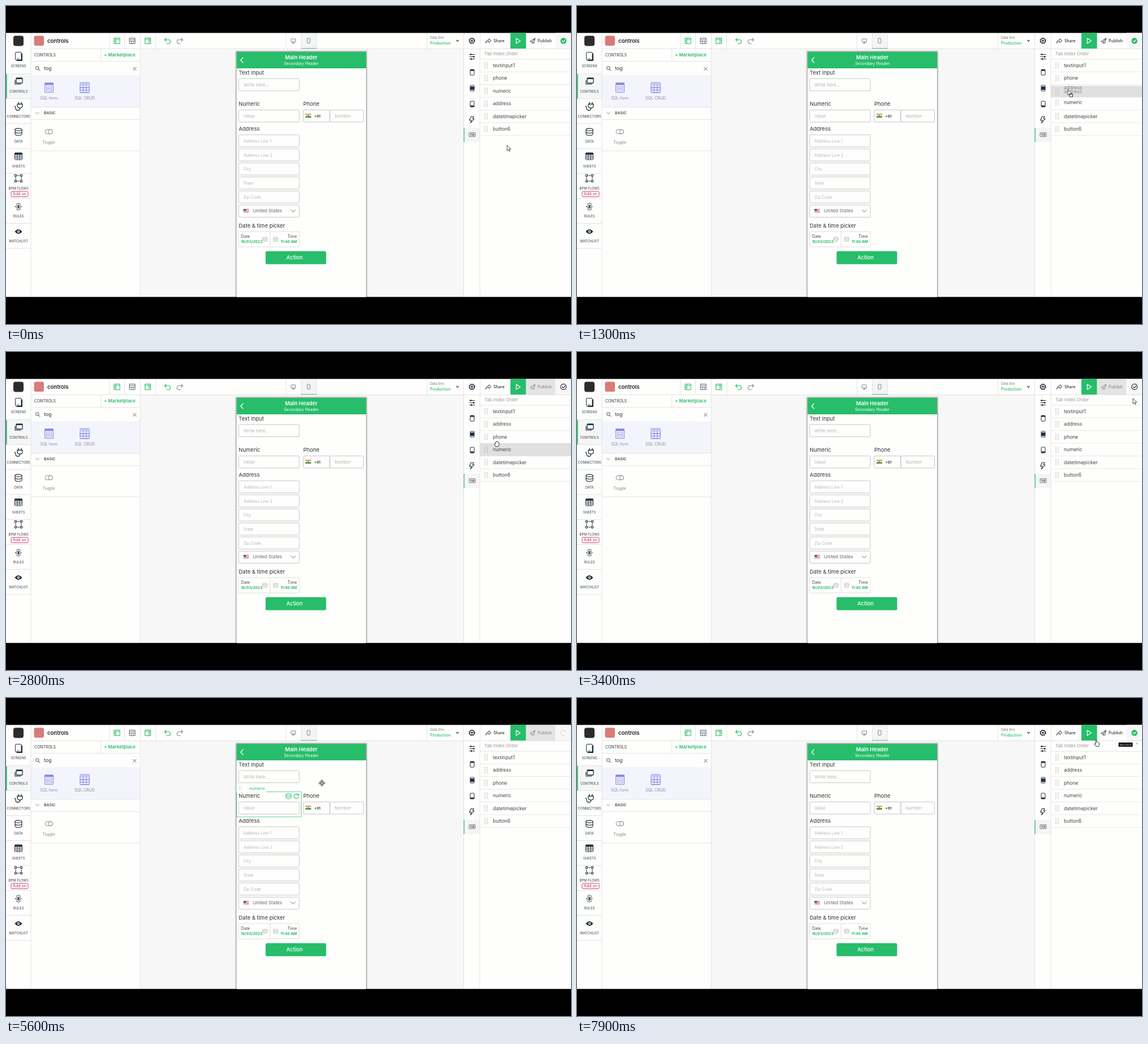
These frames come from a looping animation (998x561 px, 8 s). An HTML page:

```html
<!DOCTYPE html>
<html lang="en">
<head>
<meta charset="utf-8">
<title>Tab index order</title>
<style>
html, body { margin: 0; width: 100%; height: 100%; overflow: hidden; background: #000; }
svg { display: block; width: 100vw; height: 100vh; }
text { font-family: Inter, "Open Sans", sans-serif; white-space: pre; }
</style>
</head>
<body>
<svg id="stage" viewBox="0 0 998 561"></svg>
<script>
const GREEN = '#27bd6a', INK = '#22313f', LINE = '#e3e3e3', BODY = '#444', HINT = '#b5b5b5', PAPER = '#fefffd';
const LOOP = 8000, STEP = 100;

// Drawing helpers, each returns markup
const rect = (x, y, w, h, fill, more = '') =>
  `<rect x="${x}" y="${y}" width="${w}" height="${h}" fill="${fill}" ${more}/>`;
const box = (x, y, w, h, stroke = '#c6c6c6', r = 1.5, sw = 1, fill = 'none') =>
  rect(x, y, w, h, fill, `stroke="${stroke}" stroke-width="${sw}" rx="${r}"`);
const text = (x, y, size, str, fill = BODY, weight = 400, anchor = 'start') =>
  `<text x="${x}" y="${y}" font-size="${size}" fill="${fill}" font-weight="${weight}" text-anchor="${anchor}">${str}</text>`;
const path = (d, stroke = INK, sw = 1, fill = 'none') =>
  `<path d="${d}" stroke="${stroke}" stroke-width="${sw}" fill="${fill}" stroke-linecap="round" stroke-linejoin="round"/>`;
const circle = (x, y, r, fill = 'none', stroke = 'none', sw = 1, more = '') =>
  `<circle cx="${x}" cy="${y}" r="${r}" fill="${fill}" stroke="${stroke}" stroke-width="${sw}" ${more}/>`;
const hline = (x, y, w, c = LINE) => rect(x, y, w, 1, c);
const vline = (x, y, h, c = LINE) => rect(x, y, 1, h, c);
const at = (x, y, body, more = '') => `<g transform="translate(${x} ${y}) ${more}">${body}</g>`;

const database = (c, s = 1) => at(0, 0,
  `<ellipse cy="-4" rx="6" ry="2.2" fill="none" stroke="${c}" stroke-width="1.2"/>` +
  path('M-6-4V4C-6 7 6 7 6 4V-4M-6 0C-6 3 6 3 6 0', c, 1.2), `scale(${s})`);

const table = (c, head) => box(-6.5, -6, 13, 12, c, 1, 1) + rect(-6.5, -6, 13, 3.5, head) +
  path('M-2.2-3V6M2.2-3V6M-6 0H6M-6 3H6', c, .9);

const eye = pupil => path('M-6 0Q0-7 6 0Q0 7-6 0Z', INK, 1.1, pupil ? INK : 'none') +
  circle(0, 0, 2.2, pupil ? '#fff' : INK) + (pupil ? circle(0, 0, 1.1, INK) : '');

function sideNav() {
  const nodes = [[-5, -5], [5, -5], [-5, 5], [5, 5]].map(([x, y]) => box(x - 1.6, y - 1.6, 3.2, 3.2, INK, 1, 1.2)).join('');
  const items = [
    ['SCREENS', 89, 108, rect(-3.5, -5.5, 10.5, 13.5, INK, 'rx="1"') + box(-5.5, -7.5, 10.5, 13.5, INK, 1, 1, '#fff') + path('M-2 4H1.5', INK, .8)],
    ['CONTROLS', 133, 152.5, path('M-6-2V5H4', INK, 1.2) + box(-4, -6, 11, 9, INK, 1, 1.3) + rect(-4, -6, 11, 2, INK)],
    ['CONNECTORS', 177, 196.5, path('M0-7V-4M5-7V-4M2.5 3V4Q2.5 7-1 7Q-5 7-5 3Q-5 0-7 0', INK, 1.3) + path('M-2-4H7V-1Q7 3 2.5 3Q-2 3-2-1Z', INK, 1.3)],
    ['DATA', 222, 240.5, database(INK)],
    ['SHEETS', 265, 284.5, table(INK, INK)],
    ['BPM FLOWS', 304, 324, nodes + path('M-2-5H2M-5-2V2M5-2V2M-2 5H2', INK, .9)],
    ['RULES', 354, 373, path('M-4-4L0-6.3L4-4M-4 4L0 6.3L4 4', INK, .9) + at(0, 0, eye(false), 'scale(.85)')],
    ['WATCHLIST', 398, 416.5, eye(true)]
  ];
  let out = rect(0, 75, 44, 438.5, PAPER) + rect(0, 119, 44, 44, '#f5f6f6') + rect(0, 119, 1.6, 44, GREEN);
  items.forEach(([name, iconY, base, icon], i) => {
    out += at(22, iconY, icon) + text(22.2, base, 5.9, name, '#333f4a', 400, 'middle') + hline(0, 119 + 44 * i, 44);
  });
  return out + box(9, 327, 30, 9.5, '#cf3f78', 2, 1, '#fff') + text(24, 334.4, 7.1, 'Add on', '#b92d66', 400, 'middle') + vline(43.5, 48, 465);
}

function controlsPanel() {
  const violet = '#8a8de6';
  const form = box(-7.5, -8.5, 15, 17, violet, 1, 1.1) + rect(-7.5, -8.5, 15, 4, violet) +
    box(-5, -2, 10, 3, violet, 0, .8) + box(-5, 3, 10, 3, violet, 0, .8);
  return rect(44, 75, 193, 438.5, PAPER) +
    text(50, 88.6, 6.9, 'CONTROLS', '#333') + vline(167, 75, 22) + hline(44, 97, 193) +
    text(173, 89, 8, '+ Marketplace', GREEN, 600) +
    circle(55.3, 109.5, 2.8, 'none', '#444') + path('M57.5 111.7L60 114', '#444') +
    text(67, 113.2, 8.8, 'tog', '#333') + path('M224.5 108L230 113.5M230 108L224.5 113.5', '#555', .9) +
    rect(44, 122, 193, 56, '#f4f5fc') +
    at(76, 144, form) + at(139, 144, table(violet, '#c9caf4'), 'scale(1.25 1.45)') +
    text(75.7, 165, 6.9, 'SQL form', '#8b8b95', 400, 'middle') + text(139, 165, 7.1, 'SQL CRUD', '#8b8b95', 400, 'middle') +
    hline(44, 178, 193) + path('M52.5 187.7L55.2 190.4L58 187.7', '#777', .9) + text(67, 191.3, 6.8, 'BASIC', '#333', 500) +
    hline(44, 200, 193) + box(69, 218, 13.5, 7.5, '#8b8b8b', 3.7, 1) + circle(78.7, 221.7, 3.7, '#fff', '#8b8b8b') +
    text(75.7, 243, 6.9, 'Toggle', '#888', 400, 'middle') + hline(44, 255, 193) + vline(236.5, 75, 438);
}

function topBar() {
  const pane = (x, c, inner) => box(x - 5, 56.5, 10, 10, c, .5, 1.1) + path(inner, c, 1);
  let out = rect(0, 47, 998, 28, PAPER) + rect(521, 48, 28, 27, '#f4f5f5') + hline(0, 75, 998);
  for (const x of [182, 209, 237, 264, 494, 521, 548, 743, 808, 837]) out += vline(x, 48, 27);
  return out + rect(13, 52.5, 18, 18, '#2c2c2c', 'rx="4"') + rect(49.5, 52.5, 17.5, 17.5, '#d97b78', 'rx="3"') +
    text(73, 64.6, 9.5, 'controls', '#222', 600) +
    pane(196, GREEN, 'M194 57V66M191 60H194M191 63H194M194 59H201') +
    pane(223, '#6d7780', 'M218 59H228M218 62H228M221.5 62V66M225 62V66') +
    pane(250.5, GREEN, 'M252.5 57V66M246 59H255M252.5 62H255') +
    path('M283 56.8L280.3 59.5L283 62.3M280.5 59.5H287C291.5 59.5 291.5 66.5 287 66.5H284', GREEN, 1.2) +
    path('M309.5 56.8L312.2 59.5L309.5 62.3M312 59.5H305.5C301 59.5 301 66.5 305.5 66.5H308', '#848b91', 1.1) +
    box(503.5, 58, 8, 5.5, '#7b858d', .5) + path('M505.5 65.5H509.5M507.5 63.5V65.5', '#7b858d') +
    box(532, 57, 5, 8.5, '#7b858d', 1) + rect(521, 74.3, 28, 1, '#5fb58a') +
    text(749, 58.3, 5.9, 'Data Env', '#777') + text(749, 68.1, 7, 'Production', GREEN, 500) +
    path('M795.5 60.3L797.5 62.3L799.5 60.3', '#333', 1.2) +
    circle(823, 61.3, 4.8, 'none', INK, 1.6, 'stroke-dasharray="2.6 1.17"') + circle(823, 61.3, 3.8, 'none', INK, 1) + circle(823, 61.3, 1.7, INK) +
    path('M847.5 65C848 61 850 60 853 60V57.7L857 61.2L853 64.5V62.4C850 62.4 849 63 847.5 65Z', INK, .9) +
    text(861, 64, 7.1, 'Share', '#333', 500) +
    rect(891, 47, 27.6, 28, GREEN) + path('M901.3 57L908.5 61.5L901.3 66Z', '#fff', 1.2);
}

function phone() {
  const field = (y, hint, size = 7.2, x = 411, w = 107, h = 21.5) => box(x, y, w, h) + text(x + 8.5, y + 13.6, size, hint, HINT);
  const label = (x, y, str) => text(x, y, 9.5, str, '#333');
  const calendar = x => box(x, 408, 7.5, 7, '#aaa', 1, .8) + path(`M${x} 410.3h7.5M${x + 1.5} 412.6h4.5`, '#aaa', .7);
  let out = rect(237, 75.5, 571, 438, '#f7f7f7');
  for (let i = 3; i > 0; i--) out += rect(407.3 - i, 81 - i, 228.7 + 2 * i, 440, '#000', `opacity="${.2 / i}" rx="2"`);
  out += rect(407.3, 81, 228.7, 433, PAPER) + rect(407.3, 81, 228.7, 29, GREEN) +
    path('M418.7 91L414.5 95.5L418.7 100', '#fff', 1.2) +
    text(521.5, 93.8, 9.3, 'Main Header', '#fff', 600, 'middle') + text(521.5, 103.5, 6.9, 'Secondary Header', '#fff', 400, 'middle') +
    label(411, 121.3, 'Text Input') + field(128, 'Write here...', 7.9) +
    label(411, 176.3, 'Numeric') + field(183.3, 'Value', 7.5) +
    label(525, 176.3, 'Phone') + field(183.3, 'Number', 7.6, 572, 59.5) + box(525, 183.3, 47, 21.5) +
    rect(529, 190, 10, 2.4, '#f29a3e') + rect(529, 192.4, 10, 2, '#eee') + rect(529, 194.4, 10, 2.4, '#2d8a3e') + circle(534, 193.4, .8, '#335') +
    text(544.3, 196.5, 6.5, '+91', '#333', 600) + label(411, 220.3, 'Address');
  ['Address Line 1', 'Address Line 2', 'City', 'State', 'Zip Code'].forEach((s, i) => out += field(227.2 + 24.75 * i, s));
  out += box(411, 351.2, 107, 21.5);
  for (let i = 0; i < 5; i++) out += rect(419.5, 358 + i * 1.2, 9.5, 1.2, i % 2 ? '#f3e6e6' : '#d65a63');
  return out + rect(419.5, 358, 4.5, 3.4, '#46569b') + text(436, 364, 8.2, 'United States', '#666') +
    path('M503.5 359.7L507.3 363.4L511 359.7', '#555', .9) +
    label(411, 390.7, 'Date &amp; time picker') + box(411, 398, 107, 27, '#ddd', 1) + vline(466, 398, 27, '#ddd') +
    text(415, 409, 7.2, 'Date', '#444') + text(415, 418, 6.6, '16/03/2023', GREEN, 700) + calendar(453.5) +
    text(514, 409, 7.2, 'Time', '#444', 400, 'end') + text(514, 418, 6.6, '11:46 AM', GREEN, 700, 'end') + calendar(472.5) +
    rect(458.5, 432.5, 107, 23, GREEN, 'rx="2.5"') + text(509.7, 447, 9.4, 'Action', '#fff', 500, 'middle');
}

function toolStrip() {
  return rect(808, 75.5, 29, 438, PAPER) + vline(808, 75, 438) + rect(809, 215, 28, 25, '#f5f5f5') + rect(808.5, 215, 1.2, 25, GREEN) +
    path('M819 85.5H828M819 89.5H828M819 93.5H828', INK, 1) +
    [[821, 85.5], [826, 89.5], [822, 93.5]].map(([x, y]) => rect(x - .9, y - 1.5, 1.8, 3, INK)).join('') +
    box(820, 112, 7, 10, INK, 1) + rect(820, 112, 7, 2.5, INK) +
    box(820, 140, 7, 10, INK, 1) + rect(820, 142, 7, 6, INK) +
    box(820, 168, 7, 10, INK, 1) + rect(820, 175.5, 7, 2.5, INK) +
    path('M821.5 195H826L824.2 199H827L820.5 206.5L822 201.5H818.5Z', INK, 1.1) +
    box(818, 223.5, 11, 7, '#555', 1, .8) + text(823.5, 228.9, 4.3, 'TAB', '#333', 600, 'middle') +
    rect(837, 75.5, 161, 438, PAPER) + vline(836.5, 75, 438);
}

// Timing helpers
const clamp = v => Math.max(0, Math.min(1, v));
const easeOut = (t, start, span) => 1 - (1 - clamp((t - start) / span)) ** 3;
const within = (t, a, b) => t >= a && t < b;

const route = [
  [0, 885, 246], [100, 885, 240], [200, 879, 207], [400, 867, 173], [1000, 867, 173], [1100, 867, 167], [1300, 867, 148],
  [1800, 867, 128], [2500, 867, 128], [2800, 867, 162], [2900, 869, 170], [3000, 877, 162], [3400, 982, 82],
  [3600, 989, 69], [3800, 991, 65], [4400, 991, 65], [4500, 984, 76], [4900, 850, 165], [5300, 713, 258],
  [5400, 520, 378], [5500, 470, 190], [5600, 558, 150], [5800, 700, 118], [6200, 905, 66], [6300, 910, 62],
  [7500, 910, 62], [7600, 935, 63], [7700, 984, 66], [7800, 965, 69], [7900, 917, 74], [8000, 917, 74]
];
function pointer(t) {
  const i = route.findIndex(k => k[0] > t), [a, x, y] = route[i - 1], [b, u, v] = route[i];
  const p = (t - a) / (b - a);
  return [x + (u - x) * p, y + (v - y) * p];
}

const arrow = path('M0 0V9.2L2.2 7.2L3.7 10.6L5.2 9.9L3.7 6.6H6.6Z', '#222', .8, '#fff');
const cursors = {
  arrow,
  drag: arrow + box(3.5, 7.5, 5, 4.5, '#222', 0, .9, '#fff'),
  grab: path('M-2.4 4.5L-4.3.8Q-4.2-.8-2.5 0V-3Q-1.8-4.3-.9-3V-4Q0-5 .8-4V-3.3Q1.8-4.1 2.4-2.8V-2Q3.8-2.6 4-1V1.5L2.8 4.5Z', '#222', .9, '#fff'),
  hand: path('M-.9 7V.4Q0-.9.9.4V4Q2 3.3 2.6 4.3Q3.7 3.8 4.2 4.8Q5.4 4.6 5.5 5.8V8.2L4.5 11.3H-.3L-3.2 7.2Q-2.6 5.7-.9 7Z', '#222', .9, '#fff'),
  move: path('M-5 0H5M0-5V5', '#555', 1.8) + circle(0, 0, 1.8, '#fff', '#555', .9) +
    path('M-2.2-3.3L0-5.6L2.2-3.3ZM-2.2 3.3L0 5.6L2.2 3.3ZM-3.3-2.2L-5.6 0L-3.3 2.2ZM3.3-2.2L5.6 0L3.3 2.2Z', '#555', .9, '#fff')
};
function cursorKind(t, x, y) {
  if (within(t, 1000, 2000)) return 'drag';
  if (x > 837 && y > 94 && y < 228) return 'grab';
  if (x > 891 && y < 75) return 'hand';
  return x > 407 && x < 636 && y > 110 ? 'move' : 'arrow';
}

const PITCH = 22.45, slotY = s => 104.7 + PITCH * s;

function orderList(t, x, y) {
  const dragging = within(t, 1000, 2000);
  const first = easeOut(t, 1100, 340), second = easeOut(t, 1500, 340);
  const slots = { textinput1: 0, phone: 1 + second, numeric: 2 + first, address: 3 - first - second, datetimepicker: 4, button6: 5 };
  const hoverable = t < 1000 || t >= 2600;
  const over = hoverable && x > 837 ? Math.floor((y - 93.7) / PITCH) : -1;
  let out = text(845, 87.2, 7.8, 'Tab Index Order', '#999') + hline(837, 93.5, 161);
  for (let i = 0; i < 6; i++) out += hline(837, 115.6 + PITCH * i, 161, '#e8e8e8');
  if (over >= 0 && over < 6) out += rect(837, 93.7 + PITCH * over, 161, PITCH, '#e0e0e0');
  for (const [name, slot] of Object.entries(slots)) {
    const held = dragging && name === 'address', cy = slotY(slot);
    if (held && t < 1500) out += rect(837, cy - 10.5, 161, 20, '#e0e0e0');
    let row = text(860, cy + 3, 8.5, name);
    for (let i = 0; i < 8; i++) row += circle(846 + (i % 2) * 4, cy - 4.4 + (i >> 1) * 3, .75, '#999');
    out += `<g opacity="${held ? .5 : 1}">${row}</g>`;
  }
  if (within(t, 1100, 1800)) out += `<g opacity=".6">${text(860, y - 1, 8.5, 'address')}</g>`;
  return out;
}

function saveState(t) {
  const dim = t < 4500 ? clamp((t - 1900) / 200) : 1 - clamp((t - 7100) / 300);
  const ink = dim > .5 ? '#8b8b8b' : '#333';
  let out = rect(918.6, 47, 51.9, 28, '#e4e4e4', `opacity="${dim}"`) + rect(970.5, 47, 27.5, 28, '#f6f7f7') +
    path('M926 62.3L934.5 57L932.3 66L929.3 63.5ZM934.5 57L929.3 63.5V66.5', dim > .5 ? ink : INK, .9) +
    text(939, 64, 7.2, 'Publish', ink, 500);
  const tick = c => path('M982.5 61.5L984.3 63.3L987.5 59.8', c, 1.2);
  if (within(t, 2000, 4300)) out += circle(984.7, 61.4, 5, 'none', INK, 1.1) + tick(INK);
  else if (within(t, 4300, 7200))
    out += at(984.7, 61.4, path('M0-4.6A4.6 4.6 0 1 1-4.6 0', '#d3d3d3', 1.1), `rotate(${(t - 4300) * .4})`);
  else out += circle(984.7, 61.4, 5.3, GREEN) + tick('#fff');
  return out;
}

// Grows and shrinks from its top edge
function tooltip(cx, w, size, str, scale) {
  if (scale <= 0) return '';
  const body = rect(-w / 2, 0, w, 17.4, '#111418', 'rx="2"') + text(0, 11.5, size, str, '#fff', 400, 'middle');
  return at(cx, 78.6, body, `scale(${scale})`);
}

const numericHover = () =>
  box(407.5, 165.5, 114, 44.3, '#43c47d', 0, .8) + rect(407.3, 153, 52, 13.2, PAPER) +
  [0, 1, 2, 3, 4, 5].map(i => circle(412.5 + (i % 2) * 3, 156.2 + (i >> 1) * 2.7, .6, '#999')).join('') +
  text(430, 161.6, 7.3, 'numeric', GREEN) + at(499, 173.2, database(GREEN, .75)) +
  path('M516.5 171A4.2 4.2 0 1 0 517 174.5M517 169V171.5H514.4', GREEN, 1.1);

function render(t) {
  const [x, y] = pointer(t);
  const save = t < 7000
    ? clamp((t - 3400) / 200) * (1 - clamp((t - 4400) / 200))
    : clamp((t - 7500) / 200) * (t < 7900 ? 1 : .43);
  const preview = clamp((t - 6200) / 200) * (1 - clamp((t - 7500) / 200));
  live.innerHTML = (within(t, 5500, 5700) ? numericHover() : '') + orderList(t, x, y) + saveState(t) +
    tooltip(969, 58, 7.6, 'Save (Ctrl+S)', save) + tooltip(905, 76, 8.2, 'Preview (Ctrl+P)', preview) +
    (t >= 7900 ? circle(989, 80.5, 1, '#777') : '') +
    at(x, y, cursors[cursorKind(t, x, y)]);
}

const stage = document.getElementById('stage');
stage.innerHTML = rect(0, 0, 998, 561, '#000') +
  `<clipPath id="screen">${rect(0, 47.6, 998, 465.8, '#fff')}</clipPath>` +
  `<g clip-path="url(#screen)">${phone() + controlsPanel() + toolStrip() + topBar() + sideNav()}<g id="live"></g></g>`;
const live = document.getElementById('live');

let shown = -1;
const began = performance.now();
function tick() {
  const t = Math.floor(((performance.now() - began) % LOOP) / STEP) * STEP;
  if (t !== shown) render(shown = t);
  requestAnimationFrame(tick);
}
tick();
</script>
</body>
</html>
```
